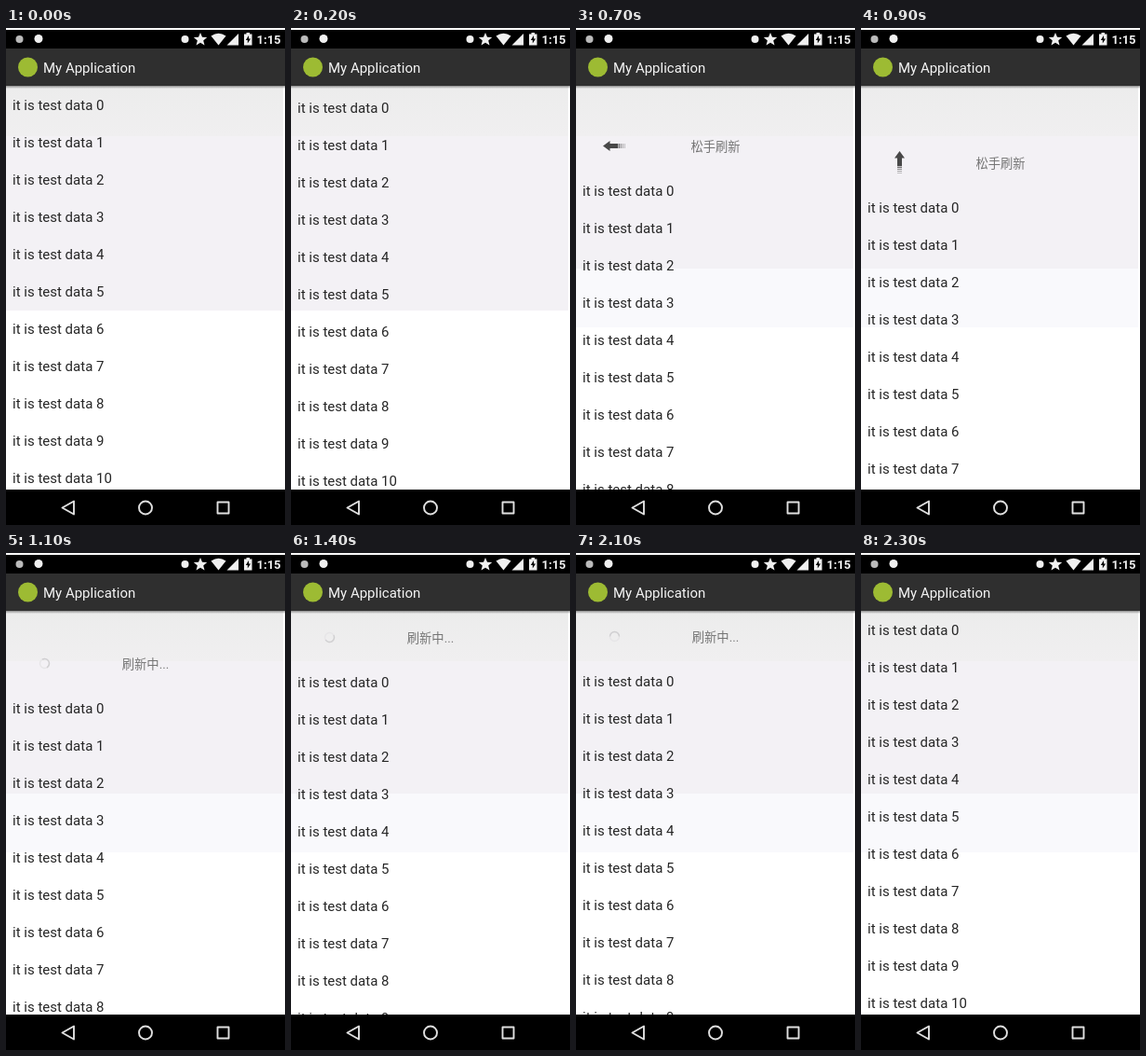
An HTML page that plays this animation: 300x533 px, repeating every 2.4 s.

```html
<!DOCTYPE html>
<html lang="en">
<head>
<meta charset="utf-8">
<style>
  html, body { margin: 0; width: 100%; height: 100%; overflow: hidden; background: #fff; }
  svg { display: block; width: 300px; height: 533px; }
  text { font-family: Roboto, 'Noto Sans CJK SC', 'Noto Sans CJK', sans-serif; font-size: 15px; fill: #262626; }
  #label { font-size: 13.3px; fill: #747474; text-anchor: middle; }
</style>
</head>
<body>
<svg viewBox="0 0 300 533">
  <defs>
    <linearGradient id="top" x2="0" y2="1">
      <stop stop-color="#ececec"/><stop offset="1" stop-color="#f0eff0"/>
    </linearGradient>
    <linearGradient id="shade" x2="0" y2="1">
      <stop stop-color="#000" stop-opacity=".4"/><stop offset="1" stop-color="#000" stop-opacity="0"/>
    </linearGradient>
  </defs>

  <rect width="300" height="533" fill="#fff"/>
  <rect id="pale" y="258" width="298" height="63" fill="#f9f9fc"/>
  <rect id="mid" y="115" width="298" fill="#f3f1f5"/>
  <rect y="62" width="298" height="54" fill="url(#top)"/>

  <g id="list">
    <text id="label" x="150" y="40"></text>
    <g id="arrow" fill="#484848">
      <path d="M-2.5-11.5h5v1h-5z" opacity=".3"/>
      <path d="M-2.5-9.5h5v1h-5z" opacity=".45"/>
      <path d="M-2.5-7.5h5v1.2h-5z" opacity=".6"/>
      <path d="M-2.5-5.5h5v1.4h-5z" opacity=".75"/>
      <path d="M-2.5-3.5h5V5H5.5L0 12.5-5.5 5h3z"/>
    </g>
    <g id="spinner" fill="none" stroke-width="1.4">
      <circle r="5" stroke="#e6e5e7"/>
      <path d="M0-5A5 5 0 0 1 0 5" stroke="#d0cfd1"/>
    </g>
  </g>

  <rect y="62" width="300" height="3" fill="url(#shade)"/>
  <rect y="22" width="300" height="40" fill="#2f2f2f"/>
  <circle cx="23.5" cy="42" r="10.5" fill="#9dbb33"/>
  <text x="40" y="48" style="fill:#f4f4f4">My Application</text>

  <rect y="2" width="300" height="20"/>
  <g fill="#f0f0f0">
    <circle cx="14.5" cy="12" r="4" fill="#bbb"/>
    <circle cx="35" cy="11.5" r="4.5"/>
    <circle cx="192.5" cy="12" r="4"/>
    <path d="M209 5l2 4.7 5.2.4-4 3.4 1.3 5-4.5-2.7-4.5 2.7 1.3-5-4-3.4 5.2-.4z"/>
    <path d="M220.5 8.5q8-5.5 16 0l-8 10z"/>
    <path d="M250 6v12.500h-12.500z"/>
    <path d="M256 6.500h2.500V5h3.500v1.500h2.500V18.500h-8.500z"/>
    <path d="M261 8l-3.200 5h2v3.500l3.200-5h-2z" fill="#000"/>
    <text x="269.500" y="17" style="font-size:13px;font-weight:700;fill:#f0f0f0">1:15</text>
  </g>

  <rect y="495" width="300" height="38"/>
  <g fill="none" stroke="#e0e0e0" stroke-width="1.9" stroke-linejoin="round">
    <path d="M73 507.500v14l-12.500-7z"/>
    <circle cx="150" cy="514.500" r="7"/>
    <rect x="227.500" y="508.500" width="12" height="12"/>
  </g>
</svg>
<script>
const $ = id => document.getElementById(id);
const list = $('list'), label = $('label'), arrow = $('arrow'), spinner = $('spinner');
const LOOP = 2400, STEP = 100, FLIP = 600, RELEASE = 1100, DONE = 2200;

for (let i = 0; i < 11; i++) {
  const row = document.createElementNS('http://www.w3.org/2000/svg', 'text');
  row.setAttribute('x', 7);
  row.setAttribute('y', 88 + 40 * i);
  row.textContent = 'it is test data ' + i;
  list.append(row);
}

// Pull distance as [time, pixels], linear in between
const pull = [[0, 0], [100, 1], [200, 3], [300, 18], [400, 41], [500, 62], [600, 78], [700, 92],
  [800, 103], [900, 110], [1000, 110], [1100, 84], [1200, 56], [2000, 56], [2100, 55], [2200, 22], [2300, 0], [2400, 0]];

function offsetAt(t) {
  const i = pull.findIndex(p => p[0] > t);
  const [t0, a] = pull[i - 1], [t1, b] = pull[i];
  return a + (b - a) * (t - t0) / (t1 - t0);
}

function draw(now) {
  const t = Math.floor(now % LOOP / STEP) * STEP;
  const busy = t >= RELEASE;
  const turn = 180 * Math.min(1, Math.max(0, (t - FLIP) / 200));

  list.setAttribute('transform', `translate(0 ${offsetAt(t)})`);
  label.textContent = busy ? '刷新中...' : t >= FLIP ? '松手刷新' : '下拉刷新';
  arrow.setAttribute('transform', `translate(41.500 34.500) rotate(${turn})`);
  arrow.setAttribute('visibility', busy ? 'hidden' : 'visible');
  spinner.setAttribute('transform', `translate(41.500 34.500) rotate(${t * 0.3})`);
  spinner.setAttribute('visibility', busy && t < DONE ? 'visible' : 'hidden');
  $('mid').setAttribute('height', t < 300 ? 188 : 143);
  $('pale').setAttribute('visibility', t < 300 ? 'hidden' : 'visible');
  requestAnimationFrame(draw);
}
draw(performance.now());
</script>
</body>
</html>
```
